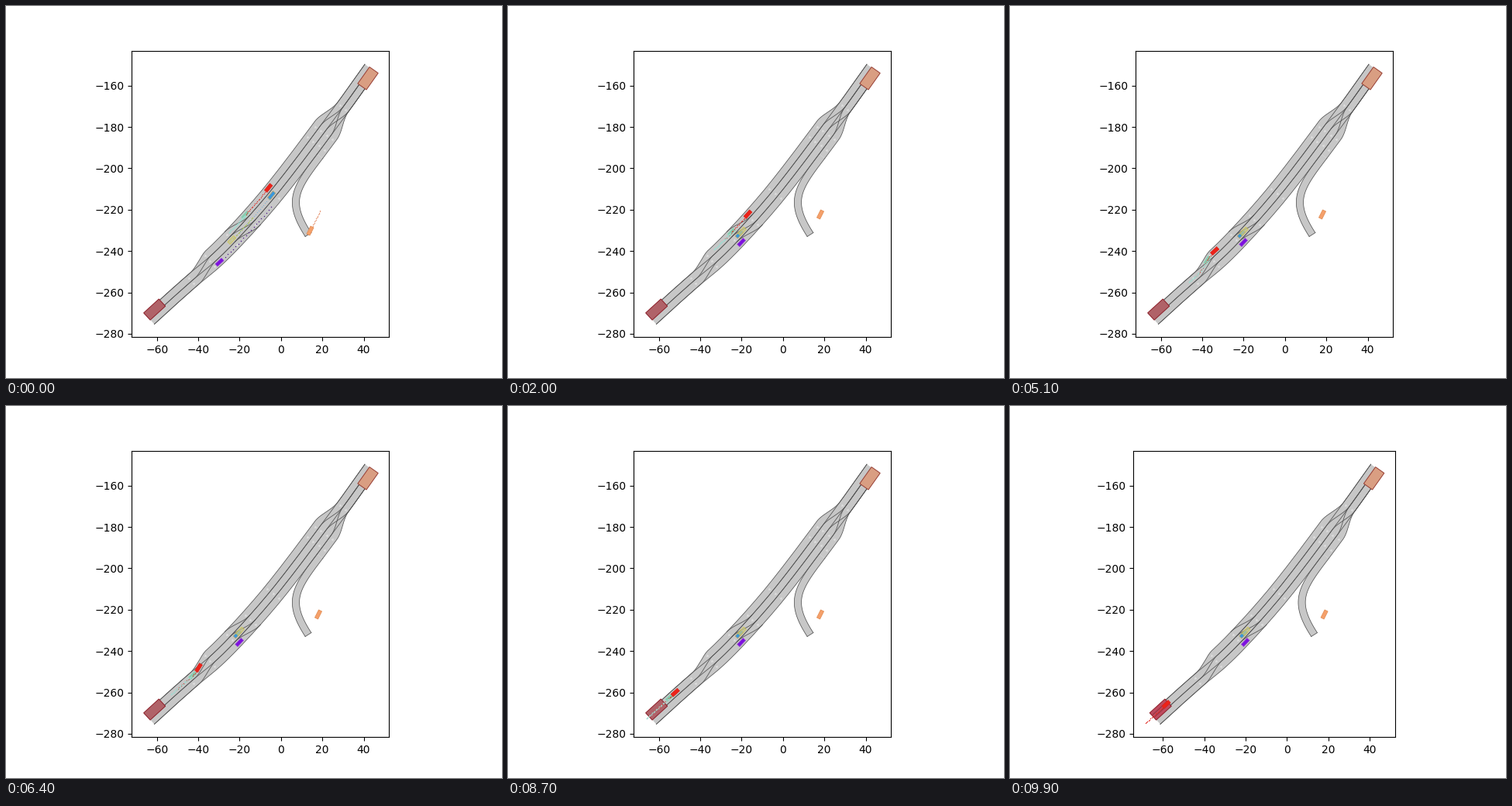
Write a matplotlib script that moves like this. It is 640 px wide and 480 px high and loops after 10 s.

```python
import numpy as np
import matplotlib.pyplot as plt
from matplotlib.animation import FuncAnimation
from matplotlib.patches import Polygon

FRAMES, STEP_MS, HORIZON = 100, 100, 20
STOP = 15            # step at which the braking cars stand still
ARRIVED = 90         # step at which the leading car is inside the goal
SCALE = 2.668        # pixels per metre
X_MIN, X_MAX = -66.55, 46.45
LANE = 9.2           # lane width in pixels
ROAD_END, FORK = 433, 130
LINE = "#505050"


def world(points):
    """Stage pixels to metres."""
    p = np.asarray(points, float)
    return np.stack([(p[..., 0] - 328) / SCALE - 10.05,
                     -160 - (p[..., 1] - 102.73) / SCALE], axis=-1)


def smooth(points, rounds=3):
    """Round off a polyline by corner cutting, keeping its ends."""
    p = np.asarray(points, float)
    for _ in range(rounds):
        a, b = p[:-1], p[1:]
        cut = np.stack([0.75 * a + 0.25 * b, 0.25 * a + 0.75 * b], 1)
        p = np.vstack([p[:1], cut.reshape(-1, 2), p[-1:]])
    return p


def normals(p):
    d = np.gradient(p, axis=0)
    d /= np.hypot(*d.T)[:, None]
    return np.stack([d[:, 1], -d[:, 0]], 1)


def ease(u):
    u = np.clip(u, 0, 1)
    return u * u * (3 - 2 * u)


# Reference line down the road; stations are pixels along it
axis = smooth([(470.5, 80.5), (434.5, 131.3), (362.5, 228), (320.4, 278),
               (273, 328), (243, 351), (165, 422.2)])
station = np.r_[0, np.cumsum(np.hypot(*np.diff(axis, axis=0).T))]
axis_normal = normals(axis)


def place(s, lane):
    """Point at a station, shifted sideways by a number of lanes."""
    def col(table, k):
        return np.interp(s, station, table[:, k])
    return np.stack([col(axis, k) + LANE * lane * col(axis_normal, k)
                     for k in (0, 1)], axis=-1)


def left_lanes(s):
    return 1 + ease((s - 60) / 38) - ease((s - 319) / 36)


def right_lanes(s):
    return 1 + ease((s - 62) / 38)


def outer(s):
    return place(s, 0.5 - left_lanes(s))


def inner(s):
    return place(s, -0.5)


def opposite(s):
    return place(s, 0.5)


fig = plt.figure(figsize=(6.4, 4.8), dpi=100)
ax = fig.add_subplot()
ax.set_aspect("equal", adjustable="box")
ax.set_ylim(-281.615, -143.085)


def stroke(points):
    ax.plot(*world(points).T, color=LINE, lw=0.55, zorder=2)


def surface(a, b):
    ax.add_patch(Polygon(world(np.vstack([a, b[::-1]])), fc="#c7c7c7",
                         ec="none", zorder=1))


# Road
s = np.linspace(0, ROAD_END, 220)
upper = np.linspace(0, FORK, 70)
left, right = left_lanes(s), right_lanes(upper)
surface(place(s, -left), place(s, 1))
surface(place(upper, 0), place(upper, right))
for lane in (-left, 1 - left, 2 - left, -1, 0, 1):
    stroke(place(s, lane))
for lane in (right, right - 1):
    stroke(place(upper, lane))

# Lane shift in the lower part
shift = np.linspace(246, 284, 20)
for lane in (1, 0, -1):
    stroke(place(shift, lane - ease((shift - 246) / 38)))

# Ramp
u = np.linspace(0, 1, 40)[:, None]
p0, p1, p2, p3 = np.array([place(FORK, 1.5), (373, 236), (362, 252),
                           (390, 295)])
ramp = ((1 - u) ** 3 * p0 + 3 * u * (1 - u) ** 2 * p1
        + 3 * u ** 2 * (1 - u) * p2 + u ** 3 * p3)
sides = [ramp + k * 0.5 * LANE * normals(ramp) for k in (-1, 1)]
surface(*sides)
for side in sides:
    stroke(side)
stroke([side[-1] for side in sides])

# Direction marks, one per lane
for at in (62, 103, 120, 205, 250, 285, 325, 360):
    first = -np.round(left_lanes(at))
    last = np.round(right_lanes(at)) if at < FORK else 1
    for lane in np.arange(first, last) + 0.5:
        ax.plot(*world(place(at, lane)), marker=(3, 0, 135 if lane < 0 else -40),
                ms=3.2, mew=0, color="#dedede", zorder=3)


def box(at, s, length, width):
    """Rectangle centred on a path and turned along it."""
    c, d = at(s), at(s + 3) - at(s - 3)
    d = d / np.hypot(*d)
    f, n = length / 2 * d, width / 2 * np.array([-d[1], d[0]])
    return world([c + f + n, c + f - n, c - f - n, c - f + n])


# Goals
ax.add_patch(Polygon(box(opposite, 12.5, 26.3, 13.7), fc="#d99e82",
                     ec="#963c32", lw=0.7, zorder=4))
goal = ax.add_patch(Polygon(box(inner, 420, 26.6, 12.5), ec="#8c1e28",
                            lw=0.7, zorder=4))
streaks = [ax.plot(*world(place(np.array([408, 432]), lane)).T,
                   color="#963440", lw=0.8, zorder=5)[0]
           for lane in (-0.7, -0.3)]


class Car:
    """A car on a path, with dots where it will be next."""

    def __init__(self, at, progress, color, edge, dot, reach=None, z=7,
                 alpha=1.0, dot_size=1.0):
        self.at, self.progress, self.reach = at, progress, reach
        self.body = ax.add_patch(Polygon(np.zeros((4, 2)), fc=color, ec=edge,
                                         lw=0.5, alpha=alpha, zorder=z))
        self.dots, = ax.plot([], [], ls="none", marker="o", ms=dot_size,
                             mew=0, color=dot, zorder=6)

    def draw(self, t, visible=True):
        k = np.arange(1, HORIZON + 1)
        if self.reach is None:
            ahead = self.progress(t + k)
        else:
            fade = max(0, 1 - t / STOP)
            ahead = self.progress(t) + self.reach * fade * k / HORIZON
        dots = world(self.at(ahead))
        self.body.set_xy(box(self.at, self.progress(t), 11.2, 4.6))
        self.dots.set_data(*dots.T)
        self.body.set_visible(visible)
        self.dots.set_visible(visible and (self.reach is None or t < STOP))
        return dots


def brake(start, stop):
    """Slow evenly from one station to a halt at another."""
    return lambda t: stop + (start - stop) * max(0, 1 - t / STOP) ** 2


def side_track(d):
    return np.stack([392.5 + 0.447 * d, 290 - 0.894 * d], axis=-1)


red = Car(outer, lambda t: 203 + 2.32 * t - 0.0023 * t * t,
          "#ee2118", "#d8261e", "#e02a22", z=9)
lead = Car(outer, lambda t: 250 + 1.45 * t + 0.0028 * t * t,
           "#62cfa2", "#a5dcc8", "#9fdcd2", z=5, alpha=0.65, dot_size=1.3)
braking = [
    Car(inner, brake(208, 275), "#3a98dc", "#c9a860", "#6fb0dc", reach=65,
        dot_size=0.8),
    Car(inner, brake(285.5, 270), "#c4c68a", "#d6c62e", "#a9c450", reach=-40,
        z=8, alpha=0.75),
    Car(opposite, brake(317, 281), "#7d10e0", "#a05ad0", "#4a1488", reach=-97,
        z=8),
    Car(side_track, brake(0, 23.5), "#f5a06a", "#e08a50", "#e8a080",
        reach=29),
]


def update(t):
    tail = red.draw(t)
    lead.draw(t, t < ARRIVED)
    for car in braking:
        car.draw(t)
    arrived = t >= ARRIVED
    goal.set_facecolor("#be4b5f" if arrived else "#b06268")
    for line in streaks:
        line.set_visible(arrived)
    low = min(X_MIN, tail[:, 0].min())
    pad = 0.05 * (X_MAX - low)
    ax.set_xlim(low - pad, X_MAX + pad)
    return []


anim = FuncAnimation(fig, update, frames=FRAMES, interval=STEP_MS,
                     init_func=lambda: update(0), repeat=True,
                     repeat_delay=0, blit=False)
plt.show()
```
